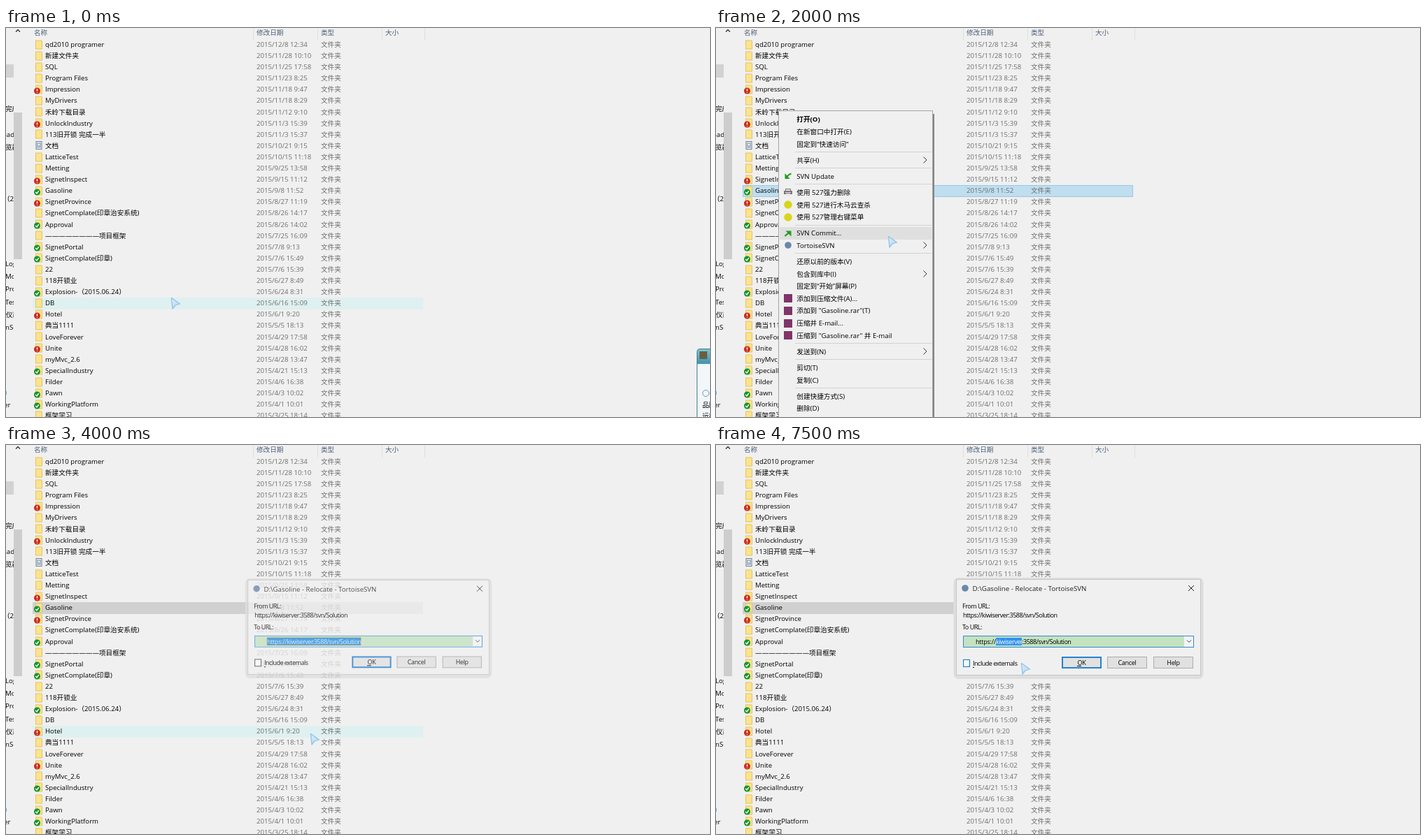
Recreate the animation shown at these times as an HTML page with a canvas. Size 1006 px wide and 557 px high, loop 8 s.

```html
<!DOCTYPE html>
<html lang="zh-CN">
<head>
<meta charset="utf-8">
<title>Relocate</title>
<style>
html, body { margin: 0; width: 100%; height: 100%; overflow: hidden; background: #f0f0f0; }
canvas { display: block; }
</style>
</head>
<body>
<canvas id="stage" width="1006" height="557"></canvas>
<script>
const ctx = document.getElementById('stage').getContext('2d');
const FAMILY = '"Open Sans", "Noto Sans CJK SC", "Noto Sans CJK", sans-serif';
const LOOP = 8000;

// Each step changes part of the state and holds until the next one.
const steps = [
  { t: 0, at: [236, 386], row: 23, popup: true, menu: 0, sub: false, dialog: 0 },
  { t: 500, at: [72, 119], row: 6 },
  { t: 1000, at: [88, 233], row: -1, popup: false, menu: 0.22, picked: 'active' },
  { t: 1500, at: [225, 307], menu: 1, item: 'TortoiseSVN' },
  { t: 2000, at: [246, 298], item: 'SVN Commit...' },
  { t: 2500, at: [281, 311], item: 'TortoiseSVN', sub: true },
  { t: 3000, at: [370, 471], subItem: 'Add...' },
  { t: 3500, at: [401, 455], subItem: 'Relocate...' },
  { t: 4000, at: [435, 413], row: 24, menu: 0, sub: false, picked: 'idle', dialog: 0.78, scale: 0.987, mark: 'all' },
  { t: 5000, at: [434, 295], row: -1, dialog: 1, scale: 1 },
  { t: 5500, at: [430, 281], mark: '', caret: true },
  { t: 6000, at: [435, 283], caret: false },
  { t: 6500, at: [436, 312], check: true },
  { t: 7000, caret: true },
  { t: 7500, caret: false, mark: 'host' }
];

// name | date | badge (r = changed, g = clean, d = document)
const files = `qd2010 programer|12/8 12:34
新建文件夹|11/28 10:10
SQL|11/25 17:58
Program Files|11/23 8:25
Impression|11/18 9:47|r
MyDrivers|11/18 8:29
禾岭下载目录|11/12 9:10
UnlockIndustry|11/3 15:39|r
113旧开锁 完成一半|11/3 15:37
文档|10/21 9:15|d
LatticeTest|10/15 11:18
Metting|9/25 13:58
SignetInspect|9/15 11:12|r
Gasoline|9/8 11:52|g
SignetProvince|8/27 11:19|r
SignetComplate(印章治安系统)|8/26 14:17
Approval|8/26 14:02|g
————————项目框架|7/25 16:09
SignetPortal|7/8 9:13|g
SignetComplate(印章)|7/6 15:49|g
22|7/6 15:39
118开锁业|6/27 8:49
Explosion-（2015.06.24）|6/24 8:31|g
DB|6/16 15:09
Hotel|6/1 9:20|r
典当1111|5/5 18:13
LoveForever|4/29 17:58
Unite|4/28 16:02|r
myMvc_2.6|4/28 13:47
SpecialIndustry|4/21 15:13|g
Filder|4/6 16:38
Pawn|4/3 10:02|g
WorkingPlatform|4/1 10:01|g
框架学习|3/25 18:14`.split('\n').map(line => line.split('|'));

// label | icon, "-" is a separator, ">" opens a submenu
const mainItems = `打开(O)|bold
在新窗口中打开(E)
固定到“快速访问”
-
共享(H)|>
-
SVN Update|update
-
使用 527强力删除|printer
使用 527进行木马云查杀|guard
使用 527管理右键菜单|guard
-
SVN Commit...|commit
TortoiseSVN|svn|>
-
还原以前的版本(V)
包含到库中(I)|>
固定到“开始”屏幕(P)
添加到压缩文件(A)...|archive
添加到 "Gasoline.rar"(T)|archive
压缩并 E-mail...|archive
压缩到 "Gasoline.rar" 并 E-mail|archive
-
发送到(N)|>
-
剪切(T)
复制(C)
-
创建快捷方式(S)
删除(D)`.split('\n');

const subItems = `Show log|person
-
Repo-browser|find
Check for modifications|compare
Revision graph|graph
-
Resolved...|resolve
Update to revision...|update
Revert...|revert
Clean up...|brush
Get lock...|lock
Release lock...|lock
-
Branch/tag...|branch
Switch...|swap
Merge...|merge
Export...|swap
Relocate...|move
-
Add...|add
Unversion and add to ignore list|ignore|>
-
Create patch...|greenPatch
Apply patch...|bluePatch
Properties|person`.split('\n');

// Layers of [colour, path, stroke width]; no width means fill.
const lens = 'M3 -1a3.3 3.3 0 1 0 -6.6 0a3.3 3.3 0 1 0 6.6 0M2 2L5 5';
const dot = 'M4.8 0a4.8 4.8 0 1 0 -9.6 0a4.8 4.8 0 1 0 9.6 0';
const petals = 'M-5 -5h4l1 2 1 -2h4v4l-2 1 2 1v4h-4l-1 -2 -1 2h-4v-4l2 -1 -2 -1z';
const twoBoxes = 'M-5 -5h6v5h-6z';
const icons = {
  update: [['#259b24', 'M-4.5 -4v8h7z'], ['#259b24', 'M-2 1.5Q0 -2 4.5 -3.5', 2]],
  commit: [['#259b24', 'M4.5 4.5v-8h-8z'], ['#259b24', 'M-4.5 4Q-2 1 2 -1', 2]],
  printer: [['#777', 'M-4 -5h8v3h2v5h-12v-5h2z'], ['#e5e5e5', 'M-3 -4h6v2h-6zM-4 0h8v1h-8zM-3 2h6v3h-6z']],
  guard: [['#d9d51c', 'M5.8 0a5.8 5.8 0 1 0 -11.6 0a5.8 5.8 0 1 0 11.6 0']],
  svn: [['#6b87ad', dot]],
  archive: [['#803468', 'M-6 -6h12v12h-12z']],
  person: [['#55602e', 'M-1 -2a2 2 0 1 0 -4 0a2 2 0 1 0 4 0M-5.5 5q0 -5 3 -5t3 5z'], ['#8b965d', 'M1 1h4M1 3h4M1 5h4', 1]],
  find: [['#f2c654', 'M-5 -5h7v6h-7z'], ['#56616e', lens, 1.6]],
  compare: [['#3479c4', 'M-5 -4h5v4h-5z'], ['#f5f8ff', 'M-1 -1h6v6h-6z'], ['#3479c4', 'M-1 -1h6v6h-6zM1 2h3', 1]],
  graph: [['#8baed4', 'M-4 -5h6v6h-6z'], ['#334d78', lens, 1.6]],
  resolve: [['#e58b2a', 'M-5 -4h9L0 2z'], ['#38a82d', 'M-4 0L-1 4L5 -4', 2]],
  revert: [['#2678c5', 'M-3 -3h4q4 1 2 5q-1 3 -5 2', 2], ['#2678c5', 'M-5 -3l4 -3v6z']],
  brush: [['#e8b032', 'M-5 -3l7 -1 2 4 -5 5z'], ['#936025', 'M1 -1L5 -5M-4 0l5 3', 1.5]],
  lock: [['#777', 'M-2.5 -1v-2q2.5 -4 5 0v2', 1.3], ['#d5c995', 'M-4 -1h8v6h-8z'], ['#89836b', 'M-4 -1h8v6h-8z', 1]],
  branch: [['#3478b5', 'M-2 5v-9M-2 1Q3 1 3 -2', 2], ['#3478b5', 'M-5 -2l3 -4 3 4zM0 -1l3 -4 3 4z']],
  swap: [['#3181c5', twoBoxes], ['#43a632', 'M-1 -1h6v5h-6z'], ['#e8f4ef', 'M-4 -3h4v1h-4zM0 1h4v1h-4z']],
  merge: [['#2f6cac', 'M-4 -5L0 0L4 -5M0 0v4', 2], ['#2f6cac', 'M-3 2h6l-3 4z']],
  move: [['#e6c244', 'M-5 -4h9v7h-9z'], ['#43a632', 'M-5 -5h5v4h-5zM0 1h5v4h-5z']],
  add: [['#26739e', 'M-3 0h6M0 -3v6', 3]],
  ignore: [['#d73525', 'M-5 -5h9v6h-9z'], ['#e5a52d', 'M-3 1h8v4h-8z'], ['#7d2f28', 'M-4 -1h8v2h-8z']],
  greenPatch: [['#38b848', petals]],
  bluePatch: [['#5585db', petals]],
  folder: [['#e7c35c', 'M-5 -6.5h9l1 1v12h-10z'], ['#fbe38f', 'M-4 -5.5h8v11h-8z']],
  sheet: [['#6d7d8b', 'M-4.5 -6h9v12h-9z'], ['#f5f7f8', 'M-3.5 -5h7v10h-7z'], ['#607d99', 'M-3 -3h6M-3 -1h2M1 -1h2M-3 1h6M-3 3h6', 1]],
  r: [['#cb2e20', dot], ['#fff', 'M0 -3v3.5M0 2v1', 1.5]],
  g: [['#15962b', dot], ['#fff', 'M-2.5 0l2 2 3 -4', 1.5]],
  close: [['#222', 'M-4 -4l8 8M4 -4l-8 8', 1]],
  right: [['#333', 'M-2.5 -4.5L2 0L-2.5 4.5', 1]],
  down: [['#444', 'M-3 -1.5L0 1.5L3 -1.5', 1]],
  up: [['#333', 'M-3 1.5L0 -1.5L3 1.5', 1.3]]
};

function rect(x, y, w, h, fill, edge, line = 1) {
  if (fill) { ctx.fillStyle = fill; ctx.fillRect(x, y, w, h); }
  if (edge) {
    ctx.strokeStyle = edge;
    ctx.lineWidth = line;
    ctx.strokeRect(x + line / 2, y + line / 2, w - line, h - line);
  }
}

function icon(name, x, y, scale = 1) {
  ctx.save();
  ctx.translate(x, y);
  ctx.scale(scale, scale);
  for (const [color, path, width] of icons[name]) {
    ctx.fillStyle = ctx.strokeStyle = color;
    ctx.lineWidth = width || 1;
    width ? ctx.stroke(new Path2D(path)) : ctx.fill(new Path2D(path));
  }
  ctx.restore();
}

// y is the middle of the capitals.
function text(str, x, y, color = '#000', { size = 9.65, weight = 400, align = 'left', gap = 0 } = {}) {
  ctx.font = `${weight} ${size}px ${FAMILY}`;
  ctx.letterSpacing = gap + 'px';
  ctx.textAlign = align;
  ctx.fillStyle = color;
  ctx.fillText(str, x, Math.round(y + 3.4));
}

function drawSidebar() {
  rect(0, 52, 11, 19, '#d2d2d2');
  rect(11, 121, 12, 210, '#cdcdcd');
  icon('up', 17, 4);
  ctx.save();
  ctx.beginPath();
  ctx.rect(0, 0, 11, 557);
  ctx.clip();
  const labels = [['完成', -1, 116], ['oad', -5, 153], ['览器', -1, 171], ['（2', -4, 245], ['Log', -1, 338],
    ['Mo', -1, 356], ['Pro', -1, 374], ['Test', -1, 393], ['仪器', 0, 411], ['nSe', -1, 429], ['er', -3, 540]];
  for (const [label, x, y] of labels) text(label, x, y);
  ctx.restore();
  rect(0, 520, 1, 5, '#62b5ee');
}

function drawFiles(s) {
  [['名称', 40], ['修改日期', 358], ['类型', 450], ['大小', 542]].forEach(([label, x]) => text(label, x, 7, '#4c607a'));
  for (const x of [353, 445, 537, 598]) rect(x, 0, 1, 18, '#dfdfdf');
  files.forEach(([name, date, badge], i) => {
    const y = 23.5 + i * 16.1;
    const top = Math.round(y - 8);
    if (i === s.row) rect(38, top, 558, 17, '#dff0f0');
    if (name === 'Gasoline' && s.picked) {
      s.picked === 'active' ? rect(38, top, 558, 17, '#bfdeef', '#98c9e8') : rect(38, top, 558, 17, '#d0d0d0');
    }
    icon(badge === 'd' ? 'sheet' : 'folder', 47, Math.round(y));
    if (badge === 'r' || badge === 'g') icon(badge, 44.5, Math.round(y) + 2, 0.95);
    text(name, 56, y);
    text('2015/' + date, 358, y, '#6d6d6d');
    text('文件夹', 450, y, '#6d6d6d');
  });
}

function drawPopup() {
  ctx.beginPath();
  ctx.roundRect(987.5, 459.5, 40, 120, 4);
  ctx.fillStyle = '#f3f7f9';
  ctx.fill();
  ctx.save();
  ctx.clip();
  const bar = ctx.createLinearGradient(0, 460, 0, 481);
  bar.addColorStop(0, '#7ec3d2');
  bar.addColorStop(1, '#3f94ad');
  rect(987, 459, 20, 22, bar);
  ctx.restore();
  ctx.strokeStyle = '#3b8298';
  ctx.lineWidth = 1;
  ctx.stroke();
  rect(991, 463, 11, 11, '#6b5d43');
  ctx.beginPath();
  ctx.arc(1000, 523, 4.5, 0, 7);
  ctx.strokeStyle = '#6796c7';
  ctx.stroke();
  text('品牌', 995, 540);
  text('运行', 995, 556);
}

function drawMenu(items, x, y, w, selected, alpha = 1) {
  rect(x + w, y + 5, 2, 557, '#858585');
  ctx.save();
  ctx.globalAlpha = alpha;
  rect(x, y, w, 570, '#f0f0f0', '#a5a5a5');
  let mid = y + (x < 200 ? 13 : 11);
  for (const line of items) {
    if (line === '-') {
      rect(x + 24, Math.round(mid - 6.6), w - 26, 1, '#d2d2d2');
      mid += 5.4;
      continue;
    }
    const [label, ...marks] = line.split('|');
    if (label === selected) rect(x + 2, Math.round(mid - 8.8), w - 4, 18, '#dfdfdf');
    text(label, x + 26.3, mid, '#000', { weight: marks.includes('bold') ? 700 : 400 });
    for (const mark of marks) {
      if (mark === '>') icon('right', x + w - 11, Math.round(mid));
      else if (icons[mark]) icon(mark, x + 14, Math.round(mid));
    }
    mid += 17.65;
  }
  ctx.restore();
}

function drawField(s) {
  const tight = { size: 9.05, gap: -0.47 };
  rect(353, 273, 330, 17, '#f4f4f4', '#2f8ad8');
  rect(354, 274, 315, 15, '#c4e2c0');
  icon('down', 676, 281);
  if (s.mark === 'all') rect(371, 276, 136, 11, '#3192ee', '#b9813d', 0.6);
  if (s.mark === 'host') rect(400, 276, 37, 11, '#3192ee');
  const rest = s.mark === 'all' ? '#fff' : '#000';
  text('https://', 371, 281.5, rest, { ...tight, gap: -0.25 });
  text('kiwiserver', 400, 281.5, s.mark ? '#fff' : '#000', tight);
  text(':3588/svn/Solution', 437, 281.5, rest, tight);
  if (s.caret) rect(436, 276, 1, 11, '#000');
}

// The halo is a ring, so a translucent window shows the list directly behind it.
function drawHalo() {
  ctx.beginPath();
  ctx.roundRect(339.5, 190, 357, 145, 7);
  ctx.rect(344, 193, 348, 136);
  ctx.fillStyle = '#dedede';
  ctx.fill('evenodd');
  ctx.strokeStyle = '#c6c6c6';
  ctx.lineWidth = 1;
  ctx.strokeRect(343.5, 192.5, 349, 137);
}

function drawDialog(s) {
  const tight = { size: 9.05, gap: -0.5 };
  ctx.save();
  ctx.globalAlpha = s.dialog;
  ctx.translate(518, 261);
  ctx.scale(s.scale, s.scale);
  ctx.translate(-518, -261);
  drawHalo();
  rect(344, 193, 348, 136, '#f0f0f0');
  icon('svn', 356, 205);
  text('D:\\Gasoline - Relocate - TortoiseSVN', 366.5, 205.5, '#222', { size: 9.75 });
  icon('close', 679, 205);
  text('From URL:', 352, 231, '#000', tight);
  text('https://kiwiserver:3588/svn/Solution', 353, 244, '#000', tight);
  text('To URL:', 352, 261, '#000', tight);
  drawField(s);
  rect(353, 307, 10, 11, '#fafafa', s.check ? '#0078d7' : '#444');
  text('Include externals', 367, 313, '#000', tight);
  rect(367, 318, 2, 1, '#000');
  [['OK', 494, 57], ['Cancel', 559, 57], ['Help', 625, 57]].forEach(([label, x, w], i) => {
    rect(x, 303, w, 17, '#e1e1e1', i ? '#adadad' : '#2582d3', i ? 1 : 2);
    text(label, x + w / 2, 311.5, '#000', { size: 9, gap: -0.3, align: 'center' });
  });
  rect(516, 316, 6, 1, '#000');
  ctx.restore();
}

function drawCursor([x, y]) {
  ctx.save();
  ctx.translate(x, y);
  const shape = new Path2D('M.5 .5L12.5 9L6 11L2 16z');
  const glow = ctx.createLinearGradient(0, 0, 12, 12);
  glow.addColorStop(0, '#e2f0fb');
  glow.addColorStop(1, '#b4d9f3');
  ctx.fillStyle = glow;
  ctx.strokeStyle = '#8fc3e8';
  ctx.lineWidth = 1.3;
  ctx.lineJoin = 'round';
  ctx.fill(shape);
  ctx.stroke(shape);
  ctx.restore();
}

function draw(time) {
  const s = Object.assign({}, ...steps.filter(step => step.t <= time));
  rect(0, 0, 1006, 557, '#f0f0f0');
  drawSidebar();
  drawFiles(s);
  if (s.popup) drawPopup();
  if (s.menu) drawMenu(mainItems, 89, 118, 221, s.item, s.menu);
  if (s.sub) drawMenu(subItems, 306, 177, 231, s.subItem);
  if (s.dialog) drawDialog(s);
  drawCursor(s.at);
}

const start = performance.now();
function tick() {
  draw((performance.now() - start) % LOOP);
  requestAnimationFrame(tick);
}
tick();
</script>
</body>
</html>
```
